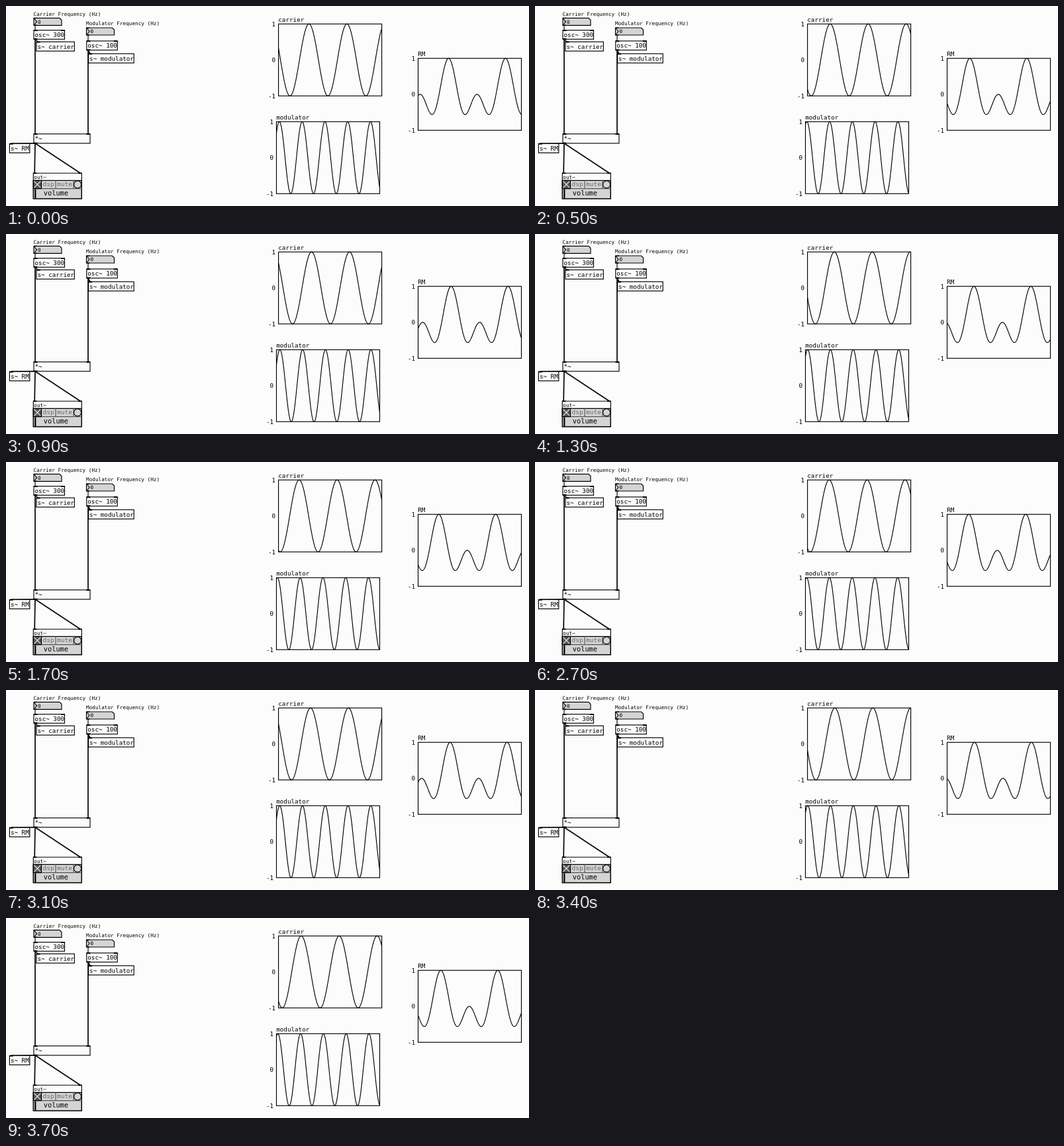
Recreate the animation shown at these times as an HTML page. Size 790 by 303 pixels, loop 3800 ms.

```html
<!DOCTYPE html>
<html lang="en">
<head>
<meta charset="utf-8">
<title>Ring modulation patch</title>
<style>
  html, body { margin: 0; width: 100%; height: 100%; overflow: hidden; background: #fcfcfc; }
  svg { display: block; width: 790px; height: 303px; }
  text { font: 9.25px "DejaVu Sans Mono", monospace; white-space: pre; }
  .small { font-size: 7.7px; }
  .line { fill: none; stroke: #000; stroke-width: 1.15; }
  .wire { fill: none; stroke: #000; stroke-width: 1.7; }
  .grey { fill: #d4d4d4; }
  .scale { text-anchor: end; }
</style>
</head>
<body>
<svg viewBox="0 0 790 303">
  <text class="small" x="41.5" y="14.6">Carrier Frequency (Hz)</text>
  <text class="small" x="121" y="29.4">Modulator Frequency (Hz)</text>

  <path class="wire" d="M44 50V194M44 50L48 54.5M124 67V194M124 67L127 72.5M44.5 208L8 208.4M44 208L43.2 253M44 208L112 253"/>
  <path class="line" d="M44 29V37M124 44V53"/>
  <g id="patch"></g>

  <g class="line">
    <path class="grey" d="M41.3 264.3H114.3V292H41.3Z"/>
    <path d="M41.3 253.2H114.3V292H41.3Z"/>
    <path d="M41.3 276.6H114.3M75 264.3V276.6M102 264.3V276.6" stroke="#555"/>
    <path d="M41.3 264.3H53.5V276.6H41.3Z" fill="#555"/>
    <path d="M42.5 265.5L52.3 275.4M52.3 265.5L42.5 275.4" stroke="#e4e4e4"/>
    <circle cx="108.1" cy="270.4" r="5.5"/>
    <path d="M44.3 277.5V291.5" stroke-width="2.2"/>
  </g>
  <path class="wire" stroke-width="2" d="M41 253.3H46.5M109 253.3H114.5"/>
  <text class="small" x="42.3" y="261.6">out~</text>
  <text x="55.6" y="272.7" fill="#666" style="font-size:9.5px">dsp</text>
  <text x="77" y="272.7" fill="#666" style="font-size:9.5px">mute</text>
  <text x="56.8" y="287.2" style="font-size:10.3px">volume</text>

  <g id="graphs"></g>
</svg>
<script>
const WIDTH = 156, HEIGHT = 109;
const PERIOD = 441;        // samples in one 100 Hz cycle
const TICK = 100, TICKS = 38;
const BLOCK = 64, DRIFT = 6, START = 18;  // each capture starts on a block edge
const patch = document.getElementById("patch");
const graphs = document.getElementById("graphs");
const add = (group, markup) => group.insertAdjacentHTML("beforeend", markup);

// Text box with thick inlets along the top and outlets along the bottom.
function box(x, y, w, h, label, inlets, outlets) {
  const bar = (px, py) => `<rect x="${px}" y="${py - 1}" width="5.5" height="2"/>`;
  add(patch, `<rect class="line" x="${x}" y="${y}" width="${w}" height="${h}" style="fill:#fcfcfc"/>
    <text x="${x + 1.5}" y="${y + 10.2}">${label}</text>` +
    inlets.map(p => bar(x + p, y + .3)).join("") +
    outlets.map(p => bar(x + p, y + h - .3)).join(""));
}

function numberBox(x, y) {
  add(patch, `<path class="line grey" style="fill:#d4d4d4" d="M${x} ${y}h39l3 3v8h-42z"/>
    <path class="line" stroke-width=".9" d="M${x} ${y}l4.5 5.5l-4.5 5.5"/>
    <path d="M${x} ${y - .6}h5v1.4h-5zM${x} ${y + 10.2}h5v1.4h-5z"/>
    <text class="small" x="${x + 6}" y="${y + 8.4}">0</text>`);
}

numberBox(42, 18.3);
numberBox(121.5, 33);
box(42, 36.7, 46.5, 13.6, "osc~ 300", [0, 41], [0]);
box(121.8, 53, 46.5, 13.8, "osc~ 100", [0, 41], [0]);
box(46, 54.3, 57.3, 14, "s~ carrier", [0], []);
box(124.6, 72.3, 68.6, 14, "s~ modulator", [0], []);
box(42, 193.8, 85, 14.2, "*~", [0, 79.5], [0]);
box(5.4, 208.5, 30.4, 14, "s~ RM", [0], []);

function graph(name, x, y, length, wave) {
  const label = (value, dy) =>
    `<text class="scale" x="${x - 4.4}" y="${y + dy + 3.4}">${value}</text>`;
  add(graphs, `<rect class="line" x="${x}" y="${y}" width="${WIDTH}" height="${HEIGHT}"/>
    <text x="${x - .3}" y="${y - 3.2}">${name}</text>` +
    label(1, 0) + label(0, HEIGHT / 2) + label(-1, HEIGHT) + `<path class="line"/>`);
  const path = graphs.lastElementChild;
  return shift => {
    let d = "";
    for (let px = 0; px <= WIDTH; px += .5) {
      const v = wave(2 * Math.PI * (px / WIDTH * length + shift) / PERIOD);
      d += `${d ? "L" : "M"}${x + px} ${(y + HEIGHT * (1 - v) / 2).toFixed(2)}`;
    }
    path.setAttribute("d", d);
  };
}

const PEAK = 2 * Math.PI * 118 / PERIOD;
const MOD_PEAK = 2 * Math.PI * 57 / PERIOD;
const draws = [
  graph("carrier", 411.6, 27.2, 400, a => Math.cos(3 * (a - PEAK))),
  graph("modulator", 408.5, 175.3, 2000, a => Math.cos(a - MOD_PEAK)),
  graph("RM", 622.5, 79.3, 400, a => Math.cos(3 * (a - PEAK)) * Math.cos(a - PEAK))
];

const begin = performance.now();
function frame() {
  const n = Math.floor(Math.max(0, performance.now() - begin) / TICK) % TICKS;
  const shift = (START + DRIFT * n) % BLOCK - START;
  draws.forEach(draw => draw(shift));
  requestAnimationFrame(frame);
}
frame();
</script>
</body>
</html>
```
